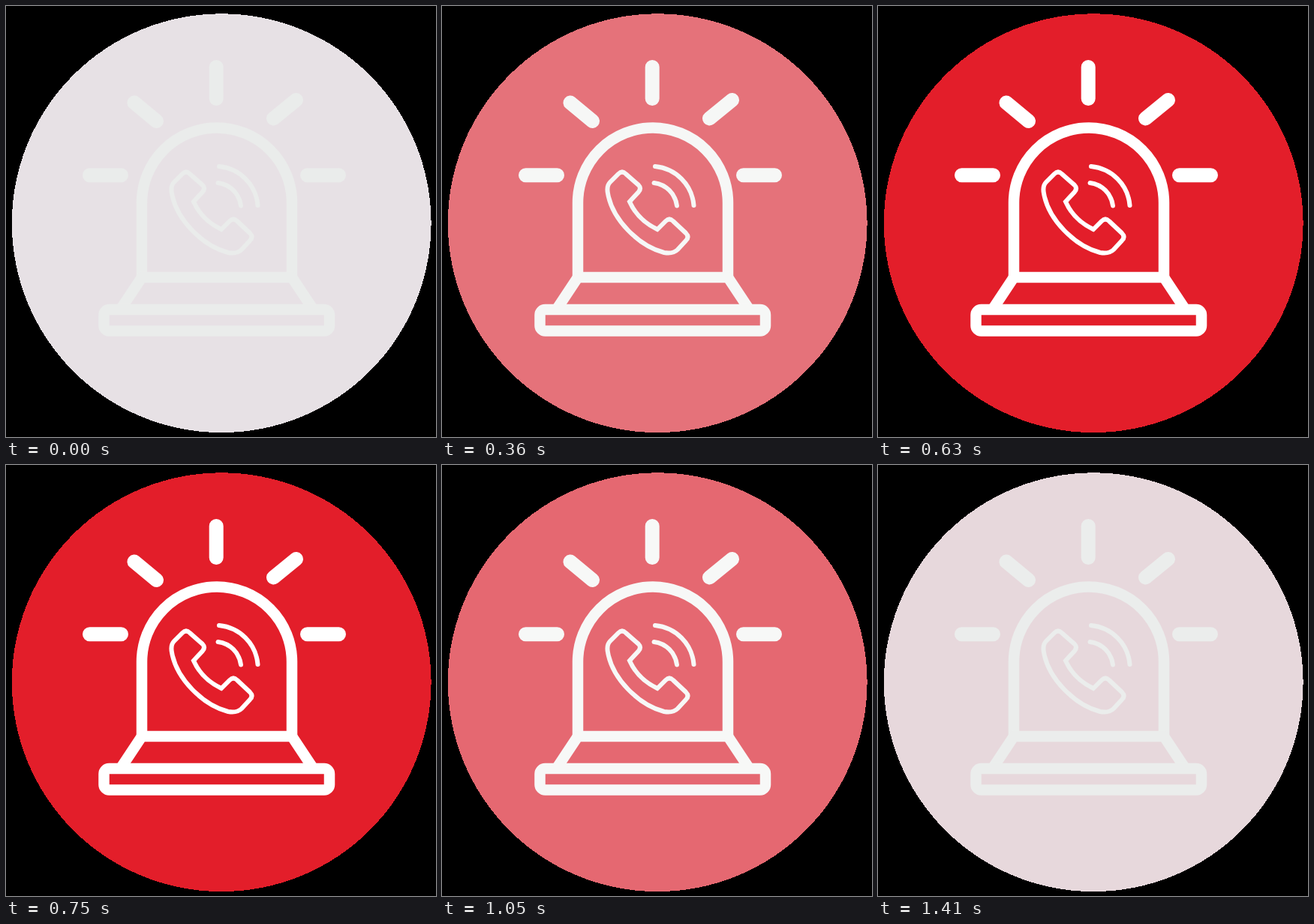
These frames come from a looping animation (573x575 px, 1440 ms). An HTML page:

```html
<!DOCTYPE html>
<html lang="en">
<head>
<meta charset="utf-8">
<title>Emergency call</title>
<style>
  html, body { margin: 0; width: 100%; height: 100%; overflow: hidden; background: #000; }
  svg { display: block; width: 100%; height: 100%; }
  #icon { fill: none; stroke-width: 14.5; }
  .rays { stroke-width: 19; stroke-linecap: round; }
  .phone { stroke-width: 6; stroke-linecap: round; }
</style>
</head>
<body>
<svg viewBox="0 0 573 575">
  <circle id="disc" cx="287.2" cy="289.7" r="279.4" shape-rendering="crispEdges"/>
  <g id="icon">
    <path class="rays" d="M280.2 81.5V123.5M111.5 225.7H153.5M401.5 225.7H443.5M171 129L200.5 153.5M386.5 125.5L356.5 150"/>
    <path d="M181 362V262.5A100 100 0 0 1 381 262.5V362" stroke-linecap="round"/>
    <path d="M152.5 405L181 362H381L409.5 405" stroke-linejoin="round"/>
    <rect x="130.5" y="405" width="300.5" height="28.5" rx="7"/>
    <g class="phone">
      <path d="M235 224Q240 219 245 224L262 239Q266 243 262 248L250 261C258 279 270 290 287 298L298 287Q303 282 308 287L325 303Q330 308 325 313L314 325Q308 331 296 329C262 320 227 285 221 250Q219 240 224 235Z"/>
      <path d="M282.5 236A35 35 0 0 1 313 266.5M284 214A57 57 0 0 1 335.5 266"/>
    </g>
  </g>
</svg>
<script>
  const LOOP = 1440, STEP = 30, FADE = 630;
  const disc = document.getElementById('disc');
  const icon = document.getElementById('icon');
  const mix = (from, to, k) => `rgb(${from.map((v, i) => Math.round(v + (to[i] - v) * k))})`;

  // Fade in to red, hold briefly, then fade back out.
  function draw() {
    const t = Math.floor(performance.now() % LOOP / STEP) * STEP;
    const strength = Math.min(1, t / FADE, (LOOP - t) / FADE);
    disc.setAttribute('fill', mix([231, 225, 229], [227, 30, 42], strength));
    icon.setAttribute('stroke', mix([234, 236, 235], [255, 255, 255], strength));
    requestAnimationFrame(draw);
  }
  draw();
</script>
</body>
</html>
```
